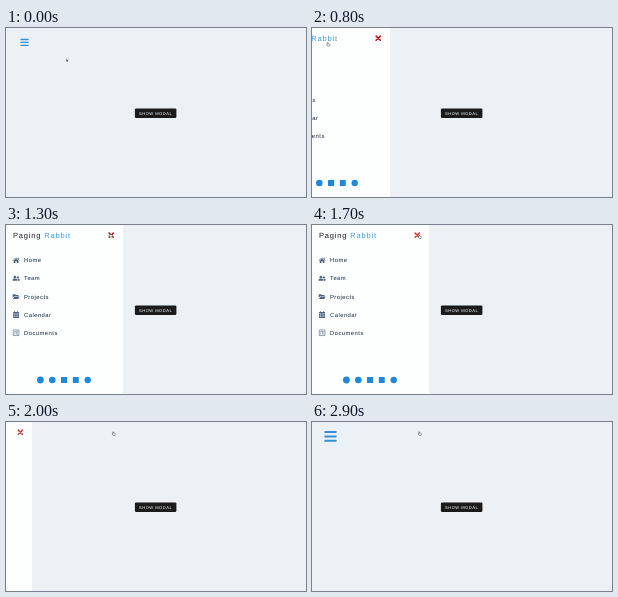
An HTML page that plays this animation: 300x169 px, repeating every 3000 ms.

```html
<!DOCTYPE html>
<html lang="en">
<head>
<meta charset="utf-8">
<title>Sidebar</title>
<style>
  html, body { margin: 0; width: 100%; height: 100%; overflow: hidden; background: #ecf1f5; }
  svg { display: block; width: 100%; height: 100%; }
  text { font-family: "Liberation Sans", Arial, sans-serif; text-rendering: geometricPrecision; white-space: pre; }
  .link { font-size: 5.85px; letter-spacing: .47px; fill: #102a42; }
  .logo { font-size: 7.5px; letter-spacing: .83px; }
  .btn { font-size: 4.1px; letter-spacing: .47px; fill: #fff; }
</style>
</head>
<body>
<svg viewBox="0 0 300 169">
  <rect width="300" height="169" fill="#ecf1f5"/>
  <g id="bars" fill="#2f92dc">
    <rect x="-4.1" y="-3.58" width="8.2" height="1.32" rx=".3"/>
    <rect x="-4.1" y="-.66" width="8.2" height="1.32" rx=".3"/>
    <rect x="-4.1" y="2.26" width="8.2" height="1.32" rx=".3"/>
  </g>
  <rect x="128.9" y="80.4" width="41.5" height="9.5" rx="1.2" fill="#1b1b1b"/>
  <text class="btn" x="133" y="86.6">SHOW MODAL</text>

  <g id="side">
    <rect x="-1" width="118" height="169" fill="#fdfefe"/>
    <text class="logo" x="6.9" y="13" fill="#181c20">Paging <tspan fill="#439bdb">Rabbit</tspan></text>
    <path id="close" d="M-2.1-2.1 2.1 2.1M2.1-2.1-2.1 2.1" transform="translate(105.2 10.2)" stroke-width="1.5" stroke-linecap="round"/>
    <g id="menu"></g>
    <g fill="#2088da">
      <circle cx="34.4" cy="155" r="3.4"/>
      <circle cx="46.3" cy="155" r="3.3"/>
      <rect x="55" y="151.9" width="6.2" height="6.2" rx=".6"/>
      <rect x="66.8" y="152.1" width="6" height="5.8" rx=".6"/>
      <circle cx="81.7" cy="155" r="3.2"/>
    </g>
  </g>

  <g id="cursor" stroke-linejoin="round">
    <path id="arrow" d="M0 0V3.1L.75 2.4 1.25 3.5 1.75 3.25 1.25 2.2H2.2Z" fill="#111" stroke="#fff" stroke-width=".25"/>
    <path id="hand" d="M0 .3Q.35-.2.7.3V1.4L2.3 1.8Q2.7 2 2.6 2.6L2.2 3.9H.5L-.8 2.3Q-.6 1.7 0 2.2Z" fill="#fff" stroke="#333" stroke-width=".45"/>
  </g>
</svg>
<script>
const $ = id => document.getElementById(id);
const LOOP = 3000, STEP = 100, WIDTH = 117;

// Icons are drawn around (0, 0), about 7 units wide
const items = [
  ["Home", '<path d="M-3.5 .1 0-2.8 3.5 .1 3.1 .6 0-1.9-3.1 .6Z"/><path d="M-2.4 .6 0-1.4 2.4 .6V2.8H.7V1.1H-.7V2.8H-2.4Z"/><path d="M1.6-2.5H2.5V-.8L1.6-1.5Z"/>'],
  ["Team", '<circle cx="-1.2" cy="-1.2" r="1.3"/><path d="M-3.5 2.4V1.6Q-3.5 .4-2.2 .4H-.2Q1.1 .4 1.1 1.6V2.4Z"/><circle cx="1.8" cy="-1" r="1.05"/><path d="M1.6 2.4V1.5Q1.5 .8 1 .4H2.3Q3.5 .4 3.5 1.6V2.4Z"/>'],
  ["Projects", '<path d="M-3.4 1.4V-2.3H-1L-.2-1.5H2.4V-.6H-1.9Z"/><path d="M-1.6-.1H3.5L2.1 2.4H-3.1Z"/>'],
  ["Calendar", '<path d="M-3-1.2V-2.5H-1.9V-3.4H-1.1V-2.5H1.1V-3.4H1.9V-2.5H3V-1.2Z"/><path fill-rule="evenodd" d="M-3-.8H3V3.4H-3ZM-2.2 0V.8H-1.3V0ZM-.45 0V.8H.45V0ZM1.3 0V.8H2.2V0ZM-2.2 1.7V2.5H-1.3V1.7ZM-.45 1.7V2.5H.45V1.7ZM1.3 1.7V2.5H2.2V1.7Z"/>'],
  ["Documents", '<path d="M-2.8-2.8H2.8V2.8H-2.8ZM-1.8-1.4H1.8M-1.8 0H-1M-.4 0H1.8M-1.8 1.3H-1M-.4 1.3H1.8" fill="none" stroke="#486581" stroke-width=".6"/>']
];
$("menu").innerHTML = items.map(([label, icon], i) => {
  const y = 35.2 + i * 18.14;
  return `<g transform="translate(10.1 ${y})" fill="#486581">${icon}</g>` +
    `<text class="link" x="18" y="${y + 2.1}">${label}</text>`;
}).join("");

const clamp = v => Math.min(1, Math.max(0, v));
const ramp = (t, start, length) => clamp((t - start) / length);
const mix = (a, b, k) => a + (b - a) * k;
const smooth = k => k * k * (3 - 2 * k);

// cubic-bezier(.42, 0, .58, 1)
function easeInOut(x) {
  let lo = 0, hi = 1;
  for (let i = 0; i < 20; i++) {
    const s = (lo + hi) / 2;
    if (1.26 * s * (1 - s) ** 2 + 1.74 * s * s * (1 - s) + s ** 3 < x) lo = s;
    else hi = s;
  }
  return smooth(lo);
}

const path = [[0, 60.4, 30.8], [400, 14.2, 14.6], [800, 15.3, 14.3], [900, 15.3, 14.3],
  [1200, 103.8, 8.2], [1400, 103.8, 8.2], [1700, 106.8, 9.6]];

function cursorAt(t) {
  let i = 0;
  while (i < path.length - 2 && t >= path[i + 1][0]) i++;
  const [t0, x0, y0] = path[i], [t1, x1, y1] = path[i + 1];
  const k = smooth(ramp(t, t0, t1 - t0));
  return [mix(x0, x1, k), mix(y0, y1, k)];
}

function draw(t) {
  const pulse = 1 + .5 * easeInOut(1 - Math.abs(1 - (t % 2000) / 1000));
  $("bars").setAttribute("transform", `translate(18.5 14.4) scale(${pulse})`);

  const open = ramp(t, 600, 300) - ramp(t, 1767, 300);
  $("side").setAttribute("transform", `translate(${(open - 1) * WIDTH - (open <= 0 ? 5 : 0)} 0)`);

  const hover = ramp(t, 1300, 300);
  const red = [mix(182, 214, hover), mix(18, 62, hover), mix(24, 56, hover)].map(Math.round);
  $("close").setAttribute("stroke", `rgb(${red})`);

  const [x, y] = cursorAt(t);
  const hand = t >= 300 && (t <= 900 || t >= 1200);
  $("cursor").setAttribute("transform", `translate(${x} ${y})`);
  $("hand").style.display = hand ? "" : "none";
  $("arrow").style.display = hand ? "none" : "";
}

const start = performance.now();
function tick(now) {
  const t = Math.max(0, now - start) % LOOP;
  draw(Math.floor(t / STEP) * STEP);
  requestAnimationFrame(tick);
}
draw(0);
requestAnimationFrame(tick);
</script>
</body>
</html>
```
